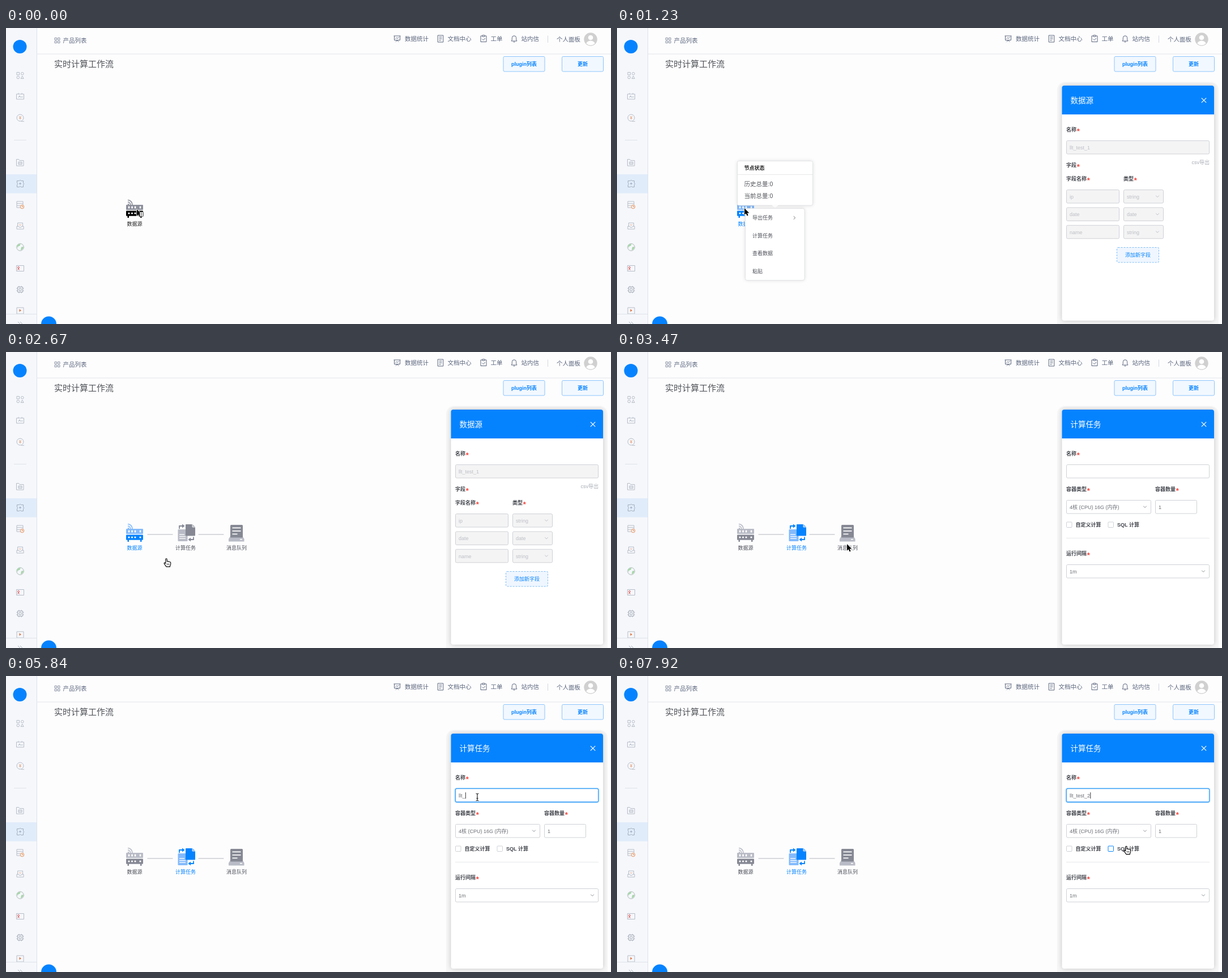
These frames come from a looping animation (1068 by 524 pixels, 8 s). An HTML page with a canvas:

```html
<!DOCTYPE html>
<html lang="zh-CN">
<head>
<meta charset="utf-8">
<style>
html, body { margin: 0; width: 100%; height: 100%; overflow: hidden; background: #fdfdfe; }
canvas { display: block; width: 1068px; height: 524px; }
</style>
</head>
<body>
<canvas id="stage"></canvas>
<script>
const W = 1068, H = 524, LOOP = 8000;
const FONT = '"Liberation Sans", "Noto Sans CJK SC", "Noto Sans CJK", sans-serif';
const BLUE = '#0583ff', INK = '#4c4f57', LINE = '#cfd1d6', SIDE = '#f5f7fb';
const canvas = document.getElementById('stage');
const c = canvas.getContext('2d');
const dpr = window.devicePixelRatio || 1;
canvas.width = W * dpr;
canvas.height = H * dpr;

// [time, value...] rows; the last row already reached counts
const at = (rows, t) => rows.reduce((a, r) => (r[0] <= t ? r : a), rows[0]);

function text(s, x, y, size, color, weight = 400, align = 'left') {
  c.font = `${weight} ${size}px ${FONT}`;
  c.textAlign = align;
  c.fillStyle = color;
  c.fillText(s, x, y + size * 0.37);
}
function box(x, y, w, h, r, fill, stroke, lw = 1) {
  c.beginPath();
  c.roundRect(x, y, w, h, r);
  if (fill) { c.fillStyle = fill; c.fill(); }
  if (stroke) { c.strokeStyle = stroke; c.lineWidth = lw; c.stroke(); }
}
function disc(x, y, r, fill) {
  c.beginPath();
  c.arc(x, y, r, 0, 7);
  c.fillStyle = fill;
  c.fill();
}
function path(x, y, d, stroke, lw = 1, fill) {
  c.save();
  c.translate(x, y);
  const p = new Path2D(d);
  if (fill) { c.fillStyle = fill; c.fill(p); }
  if (stroke) { c.strokeStyle = stroke; c.lineWidth = lw; c.stroke(p); }
  c.restore();
}
function faded(alpha, draw) {
  if (!alpha) return;
  c.save();
  c.globalAlpha = alpha;
  draw();
  c.restore();
}
function card(x, y, w, h) {
  c.save();
  c.shadowColor = 'rgba(0,0,0,.14)';
  c.shadowBlur = 6 * dpr;
  box(x, y, w, h, 3, '#fff');
  c.restore();
  box(x, y, w, h, 3, null, '#e3e4e8');
}

function sidebar() {
  box(0, 0, 54, H, 0, SIDE);
  box(54, 0, 1, H, 0, '#dde2ec');
  disc(24.5, 33, 12, BLUE);
  box(0, 259, 54, 33.5, 0, '#e0ecfa');
  const g = '#b7bcc6', o = '#e9a27c';
  path(25, 84, 'M-6-5.5h4.5v4.5h-4.5zM1.5-3.2a2.3 2.3 0 1 0 4.6 0a2.3 2.3 0 1 0-4.6 0M-6 3.5a2.3 2.3 0 1 0 4.6 0a2.3 2.3 0 1 0-4.6 0M1.2 5.5h5l-2.5-4.5z', g);
  path(25, 121, 'M-6.5-4h13v9h-13zM-3-6v2M3-6v2', g);
  path(25, 121, 'M-3 2l2-3l2 3M2 1h2.5', '#8f97a6', .8);
  path(25, 159, 'M-6 0a6 6 0 1 1 12 0a6 6 0 1 1-12 0M2 6.3h5', g);
  path(25, 159, 'M-2-3l2 2l2-2M0-1v4M-2 .5h4', o);
  box(14, 198, 22, 1, 0, '#dfe2e8');
  path(25, 238, 'M-6.5-5.5h4l1.5 2h7v9.5h-12.5zM-3 -1h6v4.5h-6zM-3 1.2h6', g);
  path(25, 275.5, 'M-5.5-5h4a1.6 1.6 0 0 1 3 0h4v4a1.6 1.6 0 0 1 0 3v4h-4a1.6 1.6 0 0 0-3 0h-4v-4a1.6 1.6 0 0 0 0-3z', '#a3adbd');
  path(25, 275.5, 'M-2 0h4M0-2v4', '#8f9db2', .8);
  path(25, 313, 'M-6-6h11v11h-11zM-6-2.3h11M-6 1.3h11', g);
  disc(28.5, 316.5, 3.8, SIDE);
  path(28.5, 316.5, 'M-3.2 0a3.2 3.2 0 1 1 6.4 0a3.2 3.2 0 1 1-6.4 0M0-2v2h1.8', '#e58b50');
  path(25, 350.5, 'M-4.5 1v-6.5h9v6.5M-6 .5h3.5l1 2h3l1-2h3.5v5h-12z', g);
  path(25, 350.5, 'M-2-3l2 2l2-2', o);
  path(25, 388, 'M-6.3 0a6.3 6.3 0 1 1 12.6 0a6.3 6.3 0 1 1-12.6 0', '#aeb8b4');
  path(25, 388, 'M-5.5-2.5q3-4 6-3l-1 3l-3 1l-1 3zM1 5l1-5l3.500-1q.5 4-3.500 6z', null, 1, '#a5d6a7');
  path(25, 425.5, 'M-6.5-5h13v10h-13z', g);
  path(25, 425.5, 'M-4.500-1.500a1.500 1.500 0 1 1 3 0a1.500 1.500 0 1 1-3 0M-4.500 3l1.500-3l1.500 3', '#e06464');
  path(25, 463, 'M-4.500-4.500h9v9h-9zM-2-2h4v4h-4zM-2-4.500v-2M2-4.500v-2M-2 4.500v2M2 4.500v2M-4.500-2h-2M-4.500 2h-2M4.500-2h2M4.500 2h2', '#a5abb7');
  path(25, 500.5, 'M-6-5.500h12v11h-12z', g);
  path(25, 500, 'M-1.500-2.500l3.500 2.500l-3.500 2.500z', null, 1, '#e07a4a');
  box(0, 506, 54, 18, 0, SIDE);
  box(0, 506, 54, 1, 0, '#dfe3ea');
  path(25, 523.5, 'M-4-3.500l3.500 3.500l-3.500 3.500M0-3.500l3.500 3.500l-3.500 3.500', '#aab0bc');
}

function header() {
  const ink = '#5c677d';
  box(55, 45.5, W - 55, 1, 0, '#e3e6ec');
  path(90.5, 22, 'M-4.500-4.500h3.500v3.500h-3.500zM1-4.500h3.500v3.500h-3.500zM-4.500 1h3.500v3.500h-3.500zM1 1h3.500v3.500h-3.500z', '#7d8798', .9);
  text('产品列表', 100.5, 22.5, 10.5, ink);
  path(690.5, 19, 'M-6-5h12M-5-5v7.500h10v-7.500M-2.500 5.500l2.500-3l2.500 3M-3 0l2-2l1.500 1.500l2.500-2', ink);
  text('数据统计', 704, 19, 10.5, ink);
  path(767, 19, 'M-4.800-6h9.600v12h-9.600zM-2.500-3h5M-2.500 0h5M-2.500 3h3', ink);
  text('文档中心', 779.5, 19, 10.5, ink);
  path(843, 19, 'M-2-5h-3v10.500h10v-10.500h-3M-2-6.200h4v2.400h-4zM-2.500 .5l2 2l3.500-3.500', ink);
  text('工单', 855.5, 19, 10.5, ink);
  path(897, 19, 'M-5 4h10l-1.300-2v-3.500a3.700 3.700 0 0 0-7.400 0v3.500zM-1.500 5.800h3', ink);
  text('站内信', 909.5, 19, 10.5, ink);
  box(956, 13.5, 1, 12.5, 0, '#d5d8df');
  text('个人面板', 972, 20, 10.5, ink);
  disc(1032, 20, 11.7, '#d0d0d0');
  c.save();
  c.beginPath();
  c.arc(1032, 20, 10.5, 0, 7);
  c.clip();
  disc(1032, 17, 4.3, '#fff');
  c.beginPath();
  c.ellipse(1032, 29, 8, 6.5, 0, 0, 7);
  c.fill();
  c.restore();
  text('实时计算工作流', 85, 63.5, 15, '#4f5257');
  button(878, 'plugin列表');
  button(981.5, '更新');
  disc(75.5, 524, 13.5, BLUE);
}
function button(x, label) {
  box(x, 50.5, 73, 26.5, 2, '#f2f8ff', '#8cc4fc');
  text(label, x + 36.5, 63.8, 9, BLUE, 600, 'center');
}

const TONES = {
  drag: ['#8e919c', '#000', '#222'],
  gray: ['#b9bcc6', '#868994', INK],
  dim: ['#8e919c', '#868994', INK],
  blue: ['#84bafb', BLUE, BLUE]
};
function sourceNode(tone) {
  const [light, dark, ink] = TONES[tone];
  path(215, 313, 'M0-4.800a4.800 4.800 0 0 1 4.600 4.800M0-8.500a8.300 8.300 0 0 1 8 8.500', light, 1.7);
  disc(216, 312, 1.2, light);
  box(212, 313, 30, 9, 1, light);
  box(212, 323.5, 30, 9.2, 1, dark);
  box(214.5, 332, 2.5, 4, 0, dark);
  box(237, 332, 2.5, 4, 0, dark);
  for (const x of [217, 222.5, 228, 237]) {
    box(x - 1.2, 315.6, 2.5, 4, .8, '#fff');
    disc(x, 328, 1.6, '#fff');
  }
  text('数据源', 227, 347, 9, ink, 400, 'center');
}
function taskNode(tone) {
  const [light, dark, ink] = TONES[tone];
  box(303.5, 314, 17, 21, 1, light);
  box(306, 322.5, 9, 1.3, 0, '#fff');
  box(306, 326, 11, 1.3, 0, '#fff');
  box(306, 329.5, 11, 1.3, 0, '#fff');
  path(317, 305, 'M0 1q0-1 1-1h11l5 5v14.500q0 1-1 1h-15q-1 0-1-1z', null, 1, dark);
  path(329, 305, 'M0 0v5h5', '#fff', .8, light);
  path(306, 313, 'M0 0v-5h6', dark, 1.8);
  path(311, 308, 'M0-3.500l4.500 3.500l-4.500 3.500z', null, 1, dark);
  path(331, 327.5, 'M0 0v4.500h-6', dark, 1.8);
  path(326, 332, 'M0-3.500l-4.500 3.500l4.500 3.500z', null, 1, dark);
  text('计算任务', 317, 347, 9, ink, 400, 'center');
}
function queueNode() {
  const [light, dark, ink] = TONES.gray;
  path(393, 326, 'M3 0h21.500l3 5v4.500h-27.500v-4.500z', null, 1, light);
  box(396, 306, 22, 22.5, 1.5, dark);
  [[310.5, 15], [316, 15], [321.5, 9]].forEach(([y, w]) => box(399.5, y, w, 1.7, 0, '#fff'));
  box(413, 331, 4, 1.5, 0, '#fff');
  text('消息队列', 407, 347, 9, ink, 400, 'center');
}
function edge(x) { box(x, 322.5, 45, 1, 0, '#b4b6bd'); }

function tooltip() {
  card(212.5, 235.5, 133, 78.5);
  text('节点状态', 224.5, 247.2, 9, '#222', 600);
  box(213, 259, 132, 1, 0, '#e8e8ea');
  text('历史总量:0', 224.5, 276, 10.5, '#55585e');
  text('当前总量:0', 224.5, 297, 10.5, '#55585e');
  path(279, 314, 'M-6-.5l6 5l6-5z', null, 1, '#fff');
}
function menu(hot) {
  card(226.5, 319.5, 104.5, 127);
  ['导出任务', '计算任务', '查看数据', '粘贴'].forEach((s, i) =>
    text(s, 239, 336 + i * 31.4, 9, hot.includes(i) ? BLUE : INK));
  path(313.5, 336, 'M-1.800-2.800l3 2.800l-3 2.800', hot.includes(0) ? BLUE : '#777', 1);
}
function submenu() {
  card(331.5, 319.5, 121, 107);
  ['导出至 HTTP', '导出至日志检索服务', '导出至时序数据库', '导出至对象存储'].forEach((s, i) =>
    text(s, 344, 333.3 + i * 26.4, 7.5, INK));
}

const chevron = (x, y, color) => path(x, y, 'M-2.800-1.500l2.800 2.800l2.800-2.800', color, 1);
function label(s, x, y) {
  text(s, x, y, 9, '#43464d', 600);
  text('*', x + s.length * 9 + .7, y + 2.4, 13, '#f5453d', 700);
}
function field(x, y, w, s, opt = {}) {
  const { off, pick, hot } = opt;
  box(x + .5, y, w - 1, 23.5, 2, off ? '#f4f4f5' : '#fff', hot ? '#58a9f8' : LINE);
  text(s, x + 6, y + 12, 9, off ? '#bdbfc4' : '#6a6d74');
  if (pick) chevron(x + w - 11, y + 11.7, off ? '#c0c2c8' : '#8b8e96');
}
function panel(title, body) {
  box(777, 96, 285, 440, 14, '#f6f6f7');
  c.save();
  c.shadowColor = 'rgba(0,0,0,.2)';
  c.shadowBlur = 9 * dpr;
  box(785.5, 102, 268.5, 416, 4, '#fff');
  c.restore();
  box(785.5, 102, 268.5, 51, [4, 4, 0, 0], BLUE);
  text(title, 800.5, 128, 13.5, '#fff', 500);
  path(1036, 128, 'M-4.200-4.200l8.400 8.400M4.200-4.200l-8.400 8.400', '#fff', 1.2);
  label('名称', 793, 180);
  body();
}
function sourceForm() {
  field(793, 199.5, 253, 'llt_test_1', { off: true });
  label('字段', 793, 243);
  text('csv导出', 1046, 238, 9, '#a9adb6', 400, 'right');
  label('字段名称', 793, 267);
  label('类型', 894, 267);
  [['ip', 'string'], ['date', 'date'], ['name', 'string']].forEach(([name, type], i) => {
    const y = 286.5 + i * 31.4;
    field(793, y, 94, name, { off: true });
    field(894, y, 71, type, { off: true, pick: true });
  });
  c.setLineDash([3, 2]);
  box(882.5, 388.5, 74, 26.5, 2, '#eff6ff', '#7dbbfa');
  c.setLineDash([]);
  text('添加新字段', 919.5, 402, 9, BLUE, 500, 'center');
}
function check(x, s, hot) {
  box(x + .5, 301, 9.5, 9.5, 1, '#fff', hot ? BLUE : LINE);
  text(s, x + 16.5, 306, 9, '#43464d', 600);
}

const TYPED = [[0, ''], [5230, 'l'], [5380, 'll'], [5535, 'llt'], [5840, 'llt_'], [5990, 'llt_t'], [6140, 'llt_te'],
  [6290, 'llt_tes'], [6440, 'llt_test'], [6740, 'llt_test_'], [6890, 'llt_test_2']];
const WORDS = ['llll1', 'llll5', 'lltq', 'lltt'];

function taskForm(t) {
  const typed = at(TYPED, t)[1];
  const hover = at([[0, ''], [7335, 'pick'], [7630, 'custom'], [7780, 'pick'], [7920, 'sql']], t)[1];
  c.save();
  if (t >= 5230 && t < 5380) c.translate(0, 13.5);
  label('容器类型', 793, 243);
  label('容器数量', 950, 243);
  field(793, 262.5, 150, '4核 (CPU) 16G (内存)', { pick: true, hot: hover === 'pick' });
  field(950, 262.5, 74, '1');
  check(793, '自定义计算', hover === 'custom');
  check(866.5, 'SQL 计算', hover === 'sql');
  box(793, 329, 253, 1, 0, '#e6e7ea');
  label('运行间隔', 793, 357);
  field(793, 376.5, 253, '1m', { pick: true });
  c.restore();

  const focus = t >= 4340;
  if (focus) box(793, 199.2, 253, 24, 3, null, '#a9dafd', 3);
  field(793, 199.5, 253, typed, { hot: focus });
  if (focus) {
    box(793.5, 199.5, 252, 23.5, 2, null, '#2f97f5');
    const x = 799 + c.measureText(typed).width;
    if (t < 4780 || t >= 5230) box(x + .3, 206, 1, 11, 0, '#333');
  }
  if (t >= 5230 && t < 5690) {
    const list = WORDS.filter(w => w.startsWith(typed));
    box(793.5, 223.5, 252, list.length * 18 + 1, 0, '#fff', '#86b8ea');
    list.forEach((w, i) => text(w, 799.5, 234 + i * 18, 10.2, '#000', 700));
  }
}

const MOVES = [[0, 'copy', 231, 321], [300, 'arrow', 231, 321], [610, 'arrow', 229, 320], [1075, 'arrow', 225, 319],
  [1380, 'hand', 242, 328], [1535, 'hand', 262, 336], [1690, 'hand', 275, 354], [1850, 'hand', 281, 368],
  [2530, 'hand', 283, 366], [2685, 'arrow', 296, 350], [2840, 'hand', 314, 326], [3160, 'hand', 330, 325],
  [3315, 'arrow', 372, 332], [3470, 'arrow', 406, 340], [3610, 'arrow', 462, 328], [3755, 'arrow', 565, 300],
  [3900, 'arrow', 680, 264], [4050, 'arrow', 772, 234], [4195, 'beam', 824, 217], [4340, 'beam', 832, 214],
  [7190, 'beam', 834, 219], [7335, 'hand', 840, 264], [7480, 'hand', 846, 276], [7630, 'hand', 850, 299],
  [7780, 'hand', 880, 279], [7920, 'hand', 899, 301.5]];
function cursor(t) {
  const [, kind, x, y] = at(MOVES, t);
  c.lineJoin = 'round';
  if (kind === 'beam') {
    const d = 'M-2.500-6q2 0 2.500 1.200q.5-1.200 2.500-1.200M0-5v10.500M-2.500 6.800q2 0 2.500-1.200q.5 1.200 2.500 1.200M-1.500 2.500h3';
    path(x, y, d, '#fff', 2.6);
    path(x, y, d, '#111', 1.1);
  } else if (kind === 'hand') {
    path(x, y, 'M-1.200 1q0-1.200 1.200-1.200t1.200 1.200v3.800q1.800-1 2.600.4q1.500-.6 2.200.6q1.700-.4 1.700 1.400v2.200q0 1.800-1.200 3v1.700h-6.500l-3.500-5q-1-1.700.6-2q.9 0 1.700 1.300z', '#000', 1.1, '#fff');
    path(x, y, 'M1.300 8.500v2.500M3.200 8.500v2.500M5 8.500v2.500', '#000', .7);
  } else {
    path(x, y, 'M0 0v11.800l2.700-2.500l1.900 4.200l2-.9l-1.900-4.100h3.700z', '#fff', 1.6, '#000');
    path(x, y, 'M0 0v11.800l2.700-2.500l1.900 4.200l2-.9l-1.900-4.100h3.700z', null, 1, '#000');
    if (kind === 'copy') {
      box(x + 5, y + 4.5, 6.5, 8, 1, '#fff', '#222', .8);
      path(x + 6.5, y + 6.5, 'M0 0h3.500M0 2h3.500M0 4h3.500', '#333', .7);
    }
  }
  c.lineJoin = 'miter';
}

function draw(t) {
  c.setTransform(dpr, 0, 0, dpr, 0, 0);
  c.fillStyle = '#fdfdfe';
  c.fillRect(0, 0, W, H);
  sidebar();
  header();

  sourceNode(at([[0, 'drag'], [300, 'dim'], [455, 'blue'], [3000, 'gray']], t)[1]);
  if (t >= 2530) {
    edge(249.5);
    edge(339.5);
    taskNode(t < 3000 ? 'gray' : 'blue');
    queueNode();
  }

  faded(at([[0, 0], [455, .5], [610, 1]], t)[1], () =>
    t < 3000 ? panel('数据源', sourceForm) : panel('计算任务', () => taskForm(t)));
  faded(at([[0, 0], [765, .5], [920, 1], [1380, .4], [1535, 0]], t)[1], tooltip);
  faded(at([[0, 0], [1535, .6], [1690, 1], [1850, .16], [2005, 0]], t)[1], submenu);
  faded(at([[0, 0], [1075, .6], [1230, 1], [2530, 0]], t)[1], () =>
    menu(at([[0, []], [1380, [0]], [1850, [0, 1]], [2005, [1]]], t)[1]));
  cursor(t);
}

function tick(now) {
  draw(now % LOOP);
  requestAnimationFrame(tick);
}
requestAnimationFrame(tick);
</script>
</body>
</html>
```
